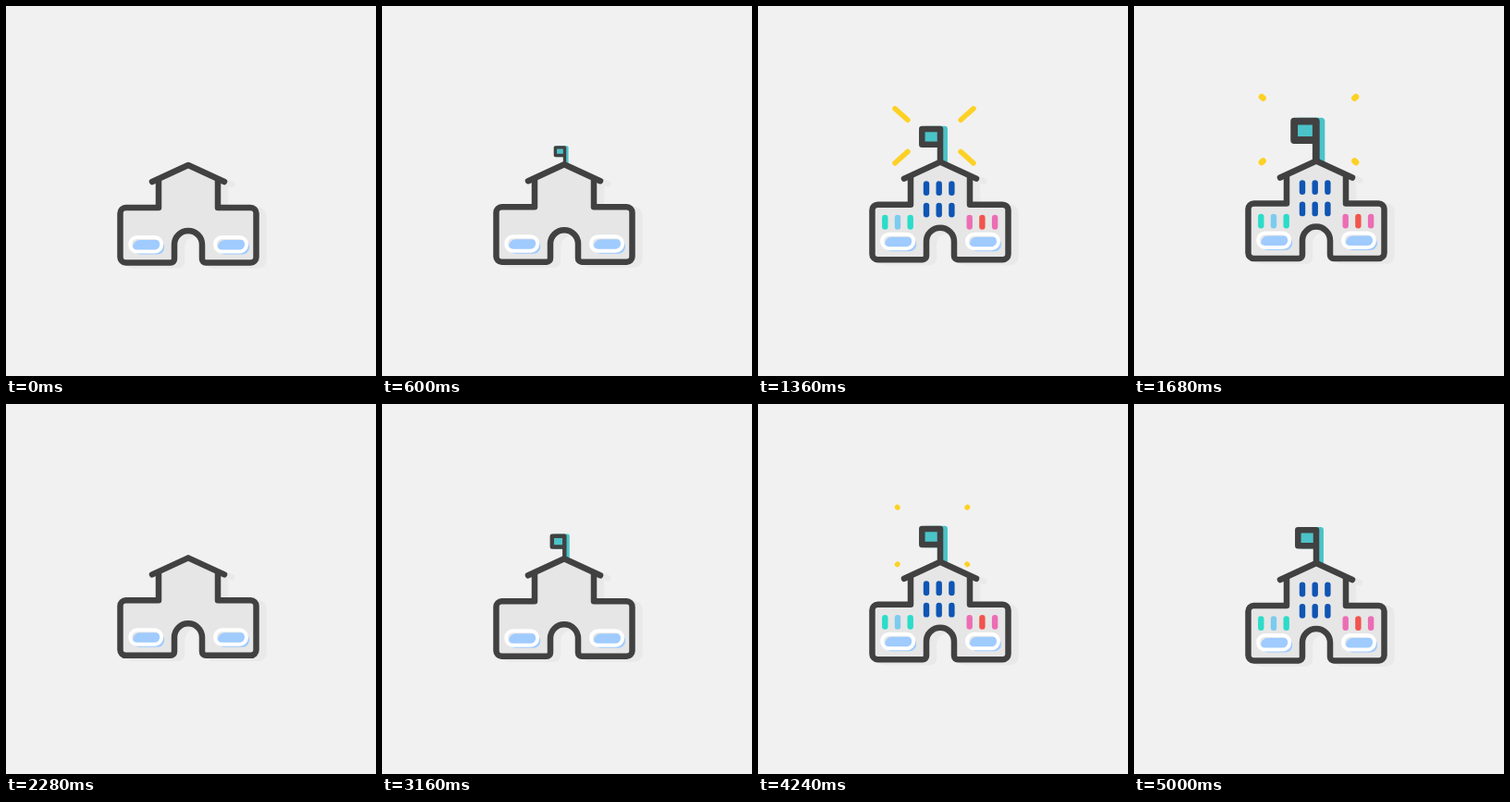
These frames come from a looping animation (400x400 px, 5040 ms). An HTML page with a canvas:

```html
<!DOCTYPE html>
<html lang="en">
<head>
<meta charset="utf-8">
<title>School</title>
<style>
html, body { margin: 0; width: 100%; height: 100%; overflow: hidden; background: #f1f1f1; }
canvas { display: block; width: 400px; height: 400px; }
</style>
</head>
<body>
<canvas id="stage" width="400" height="400"></canvas>
<script>
const ctx = document.getElementById('stage').getContext('2d');
const LOOP = 5040, HALF = LOOP / 2, STEP = 40;
const INK = '#414141', WALL = '#e6e6e6', SHADE = '#e9e9e9', TEAL = '#4bc3c8';
const AQUA = '#2bdcc9', SKY = '#7ccbee', PINK = '#ec6db4', RED = '#f2544c', BLUE = '#0f55b3';
const PEAK = 1.2;

const ramp = (t, from, to) => Math.min(1, Math.max(0, (t - from) / (to - from)));
const smooth = (t, from, to) => (1 - Math.cos(Math.PI * ramp(t, from, to))) / 2;
const mix = (a, b, u) => a + (b - a) * u;

const wall = new Path2D();
wall.moveTo(165, 188);
wall.lineTo(165, 218);
wall.arcTo(123.5, 218, 123.5, 277.5, 6);
wall.arcTo(123.5, 277.5, 182, 277.5, 6);
wall.arcTo(182, 277.5, 182, 258, 4);
wall.lineTo(182, 258);
wall.arc(197, 258, 15, Math.PI, 0);
wall.arcTo(212, 277.5, 270.5, 277.5, 4);
wall.arcTo(270.5, 277.5, 270.5, 218, 6);
wall.arcTo(270.5, 218, 229, 218, 6);
wall.lineTo(229, 218);
wall.lineTo(229, 188);

const roof = new Path2D('M158 190L197 172L236 190');
const gable = new Path2D('M165 190V187L197 172L229 187V190Z');
const banner = new Path2D('M197 172V136.3H177.3V153.2H197');

function house(fill, line) {
  ctx.fillStyle = fill;
  ctx.strokeStyle = line;
  ctx.lineWidth = 6.5;
  ctx.fill(wall);
  ctx.fill(gable);
  ctx.stroke(wall);
  ctx.stroke(roof);
}

function shifted(dx, dy, draw) {
  ctx.save();
  ctx.translate(dx, dy);
  draw();
  ctx.restore();
}

function segment(x1, y1, x2, y2, color, width) {
  ctx.strokeStyle = color;
  ctx.lineWidth = width;
  ctx.beginPath();
  ctx.moveTo(x1, y1);
  ctx.lineTo(x2, y2);
  ctx.stroke();
}

function bush(x) {
  const pill = new Path2D();
  pill.roundRect(x, 250, 34, 15.5, 7.5);
  shifted(3, 3, () => {
    ctx.fillStyle = '#9fcbff';
    ctx.fill(pill);
  });
  ctx.strokeStyle = '#fff';
  ctx.lineWidth = 4;
  ctx.stroke(pill);
}

// Pops in past full size; the first half of the loop also pops out again.
function flagScale(t, leaves) {
  if (t < 760) return PEAK * ramp(t, 480, 760);
  if (t < 1480 || !leaves) return mix(PEAK, 1, smooth(t, 760, 960));
  if (t < 1680) return mix(1, PEAK, smooth(t, 1480, 1680));
  return PEAK * (1 - ramp(t, 1680, 1960));
}

function rays(t, first) {
  const head = smooth(t, 940, 1240), tail = smooth(t, 1340, 1765);
  if (head <= 0 || tail >= 1) return;
  const [cx, x0, y0, x1, y1] = first ? [190.5, 28.5, 17, 42.5, 29.5] : [188.5, 21, 16, 38, 31];
  for (const sx of [-1, 1]) {
    for (const sy of [-1, 1]) {
      const x = u => cx + sx * mix(x0, x1, u);
      const y = u => 143.7 + sy * mix(y0, y1, u);
      segment(x(tail), y(tail), x(head), y(head), '#fdd124', 5.5);
    }
  }
}

function flag(t, first) {
  const scale = flagScale(t, first);
  if (scale <= 0) return;
  ctx.save();
  ctx.translate(198, 172);
  ctx.scale(scale, scale);
  ctx.translate(-198, -172);
  rays(t, first);
  ctx.lineWidth = 6.5;
  shifted(4.7, 0, () => {
    ctx.fillStyle = ctx.strokeStyle = TEAL;
    ctx.fill(banner);
    ctx.stroke(banner);
  });
  ctx.strokeStyle = INK;
  ctx.stroke(banner);
  ctx.restore();
}

function windowRow(x, y, colors, t, leaves) {
  colors.forEach((color, i) => {
    const delay = i * 20;
    const open = smooth(t, 1070 + delay, 1300 + delay);
    const shut = leaves ? smooth(t, 1740 + delay, 1960 + delay) : 0;
    if (open <= 0 || shut >= 1) return;
    const grow = Math.min(1, open * 6, (1 - shut) * 6);
    const left = x + i * 13.7;
    segment(left, y, left, y + 9.4 * open * (1 - shut) + 0.01, color, 6.4 * grow);
  });
}

function draw(time) {
  const first = time < HALF;
  const t = time % HALF;
  const lift = -5.7 * (time < 2440 ? smooth(time, 0, 2440) : 1 - smooth(time, 2440, LOOP));
  ctx.fillStyle = '#f1f1f1';
  ctx.fillRect(0, 0, 400, 400);
  ctx.lineCap = ctx.lineJoin = 'round';
  shifted(0, lift, () => {
    shifted(8, 3, () => house(SHADE, SHADE));
    flag(t, first);
    house(WALL, INK);
    windowRow(137.3, 232.4, [AQUA, SKY, AQUA], t, first);
    windowRow(228.7, 232.4, [PINK, RED, PINK], t, first);
    for (const y of [195.8, 219.2]) windowRow(182, y, [BLUE, BLUE, BLUE], t, first);
    bush(134.2);
    bush(226);
  });
}

function tick() {
  const now = performance.now() % LOOP;
  draw(Math.floor(now / STEP) * STEP);
  requestAnimationFrame(tick);
}
tick();
</script>
</body>
</html>
```
